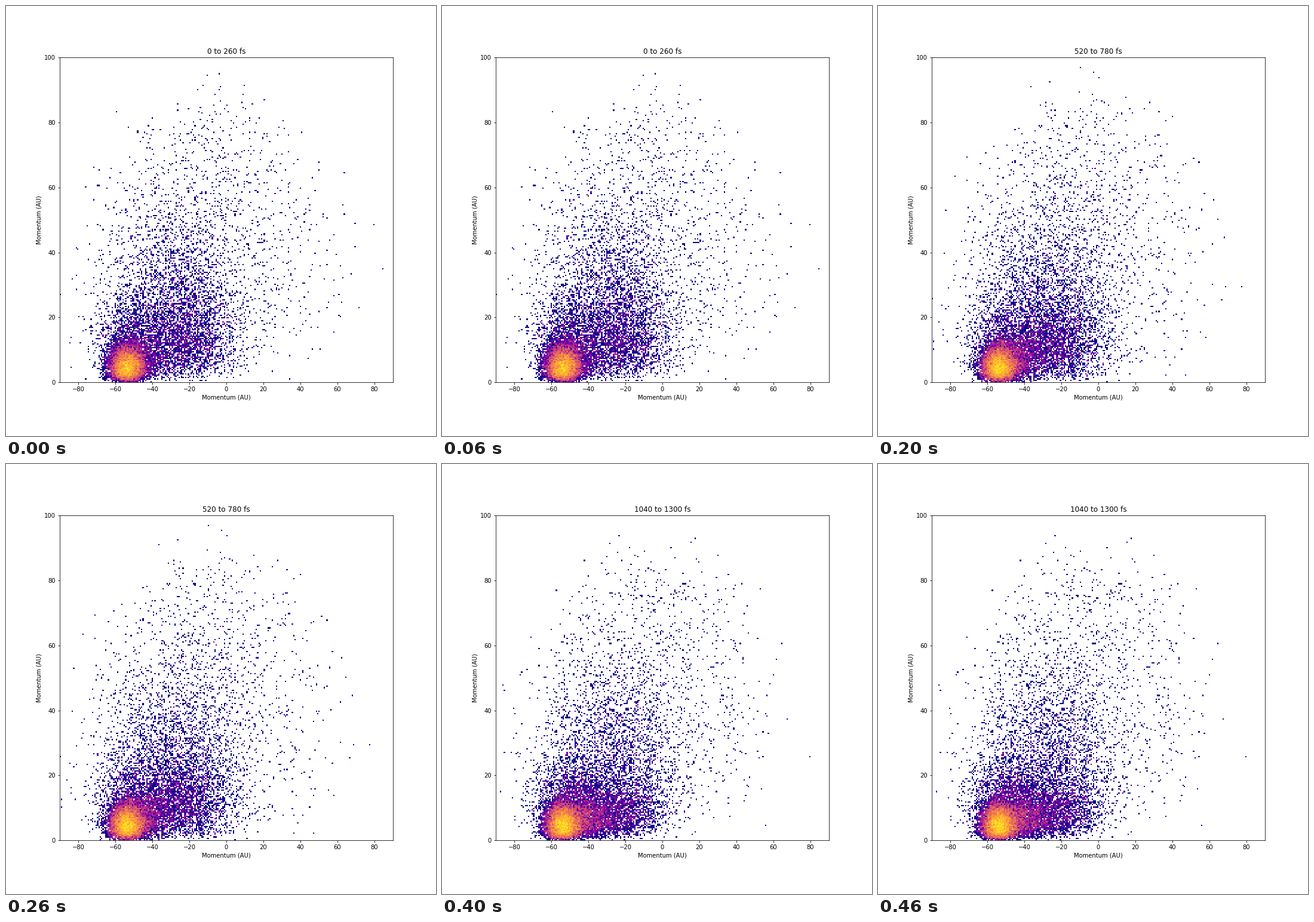
Animation of 720x720 px, one loop 500 ms. Source, as a matplotlib script:

```python
import numpy as np
import matplotlib.pyplot as plt
from matplotlib.animation import FuncAnimation
from matplotlib.colors import LogNorm

STEPS = 5
SPAN = 260  # femtoseconds per step
BINS = 250
X_RANGE, Y_RANGE = (-90, 90), (0, 100)


def cloud(rng, count, center, spread, radial):
    """Gaussian along the beam, Rayleigh across it."""
    return np.column_stack([
        rng.normal(center, spread, int(count)),
        rng.rayleigh(radial, int(count)),
    ])


def momenta(step):
    rng = np.random.default_rng(40 + step)
    t = step / (STEPS - 1)
    halo = cloud(rng, 1600, -12, 33, 42)
    limit = rng.normal(88, 7, len(halo))
    halo = halo[np.hypot(*halo.T) < limit]
    return np.vstack([
        cloud(rng, 7200 + 900 * t, -53.8, 4.6, 4.25),               # core
        cloud(rng, 800 + 1400 * t, -46 + 3 * t, 6.5 + t, 5.5),      # shoulder
        cloud(rng, 1350, -52, 9, 10),                               # fringe
        cloud(rng, 2000 + 600 * t, -23 - 4 * t, 13, 11 - 3.5 * t),  # slow lobe
        cloud(rng, 2400, -28, 18, 20),                              # wide lobe
        halo,
    ])


def counts(step):
    x, y = momenta(step).T
    hist, _, _ = np.histogram2d(x, y, BINS, range=(X_RANGE, Y_RANGE))
    return np.ma.masked_equal(hist.T, 0)


fig, ax = plt.subplots(figsize=(10, 10), dpi=72)
fig.subplots_adjust(left=0.125, right=0.9, bottom=0.125, top=0.88)
mesh = ax.pcolormesh(
    np.linspace(*X_RANGE, BINS + 1), np.linspace(*Y_RANGE, BINS + 1),
    counts(0), cmap="plasma", norm=LogNorm(1, 40))
ax.set(xlim=X_RANGE, ylim=Y_RANGE,
       xlabel="Momentum (AU)", ylabel="Momentum (AU)")
title = ax.set_title("")


def update(step):
    hist = counts(step)
    mesh.set_array(hist)
    mesh.set_clim(1, hist.max())
    title.set_text(f"{step * SPAN} to {(step + 1) * SPAN} fs")
    return mesh, title


anim = FuncAnimation(fig, update, frames=STEPS, interval=100, repeat=True)
plt.show()
```
